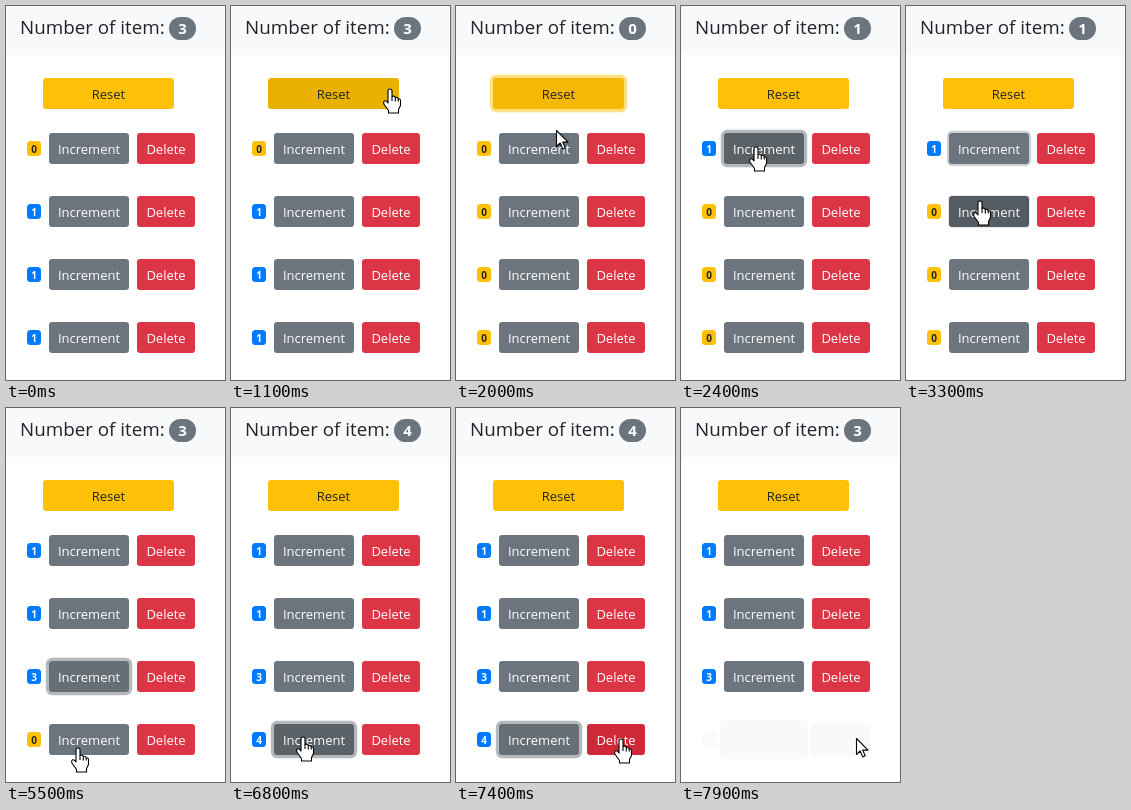
An HTML page with a canvas for the animation above (8 s loop, 219 px wide and 374 px high).

```html
<!DOCTYPE html>
<html lang="en">
<head>
<meta charset="utf-8">
<title>Item counters</title>
<style>
  html, body { margin: 0; width: 100%; height: 100%; overflow: hidden; background: #fff; }
  canvas { display: block; }
</style>
</head>
<body>
<canvas id="stage" width="219" height="374"></canvas>
<script>
const ctx = document.getElementById('stage').getContext('2d');
const LOOP = 8000, STEP = 100, EASE = 150;
const FONT = '"Open Sans", "Noto Sans", sans-serif';
const DELETED_AT = 7900;

// Pointer stops: time, x, y. The pointer jumps from one to the next.
const moves = [
  [0, -50, -50],
  [800, 204, 60], [900, 184, 70], [1000, 164, 80], [1100, 159, 83],
  [1800, 152, 91], [1900, 133, 109], [2000, 100, 124], [2100, 80, 136], [2200, 75, 141],
  [2900, 75, 157], [3000, 74, 178], [3100, 74, 195],
  [3600, 74, 220], [3700, 73, 262], [3800, 73, 271],
  [5400, 72, 295], [5500, 72, 340], [5600, 72, 333], [5700, 72, 329],
  [7200, 95, 332], [7300, 138, 333], [7400, 165, 331], [7500, 175, 330]
];

const palettes = {
  warning: { base: [255, 193, 7], hover: [224, 168, 0], active: [211, 158, 0], text: '#212529' },
  secondary: { base: [108, 117, 125], hover: [90, 98, 104], active: [84, 91, 98], text: '#fff' },
  danger: { base: [220, 53, 69], hover: [200, 35, 51], active: [189, 33, 48], text: '#fff' }
};

const makeButton = (label, x, y, w, palette, pressed, released) =>
  ({ label, x, y, w, h: 31, palette: palettes[palette], pressed, released });

const reset = makeButton('Reset', 37, 72, 131, 'warning', 1150, 1300);
const rows = [
  { start: 0, clicks: [2400] },
  { start: 1, clicks: [3400] },
  { start: 1, clicks: [4300, 4700, 5100] },
  { start: 1, clicks: [6100, 6300, 6500, 6800] }
].map((row, i) => {
  const y = 127 + 63 * i, first = row.clicks[0];
  const last = i === 3;
  return {
    ...row, y,
    increment: makeButton('Increment', 43, y, 80, 'secondary', first - 150, first),
    remove: makeButton('Delete', 131, y, 58, 'danger', last ? 7750 : Infinity, last ? DELETED_AT : Infinity)
  };
});
const buttons = [reset, ...rows.flatMap(row => [row.increment, row.remove])];

const contains = (b, x, y) => x >= b.x && x < b.x + b.w && y >= b.y && y < b.y + b.h;

// Follows a series of on/off switches with a linear transition.
function transition(switches, t) {
  let level = 0;
  switches.forEach(([time, on], i) => {
    if (time >= t) return;
    const end = Math.min(t, i + 1 < switches.length ? switches[i + 1][0] : LOOP);
    level = Math.min(1, Math.max(0, level + (on ? 1 : -1) * (end - time) / EASE));
  });
  return level;
}

for (const b of buttons) {
  b.hovers = moves.map(([time, x, y]) => [time, contains(b, x, y)]);
  const blur = Math.min(LOOP, ...buttons.map(o => o.pressed).filter(p => p > b.pressed));
  b.focuses = [[b.pressed, true], [blur, false]];
}

const rgb = (c, alpha = 1) => `rgba(${c.map(Math.round)},${alpha})`;
const mix = (a, b, k) => a.map((v, i) => v + (b[i] - v) * k);

function box(x, y, w, h, r, fill) {
  ctx.fillStyle = fill;
  ctx.beginPath();
  ctx.roundRect(x, y, w, h, r);
  ctx.fill();
}

function text(value, x, y, size, fill, weight = 400, align = 'center') {
  ctx.font = `${weight} ${size}px ${FONT}`;
  ctx.textAlign = align;
  ctx.fillStyle = fill;
  ctx.fillText(value, x, y);
}

function drawButton(b, t) {
  const p = b.palette;
  const focus = transition(b.focuses, t);
  if (focus > 0) {
    const s = 3.2 * focus;
    box(b.x - s, b.y - s, b.w + 2 * s, b.h + 2 * s, 3.2 + s, rgb(p.base, 0.5 * focus));
  }
  const held = t >= b.pressed && t < b.released;
  const color = held ? p.active : mix(p.base, p.hover, transition(b.hovers, t));
  box(b.x, b.y, b.w, b.h, 3.2, rgb(color));
  text(b.label, b.x + b.w / 2, b.y + 21, 13, p.text);
}

function countOf(row, t) {
  return (t < 1300 ? row.start : 0) + row.clicks.filter(c => c <= t).length;
}

function drawRow(row, t) {
  const count = countOf(row, t);
  box(21, row.y + 8, 14, 15, 3.5, count ? '#007bff' : '#ffc107');
  text(count, 28, row.y + 20, 10, count ? '#fff' : '#212529', 700);
  drawButton(row.increment, t);
  drawButton(row.remove, t);
}

function drawFadedRow(y) {
  box(21, y + 8, 14, 15, 3, '#fafafb');
  box(39, y - 4, 88, 39, 6, '#f8f9fa');
  box(130, y - 1, 60, 33, 4, '#f8f9fa');
}

const arrowShape = new Path2D('M.5 .5V16.5L4.2 13L6.7 18.9L9.2 17.8L6.7 12.1H12Z');
const handShape = new Path2D(
  'M-2 14V1.8Q-2 0 0 0Q2 0 2 1.8V7.5Q4.6 6.5 5.3 8.5Q7.6 7.7 8.2 9.8Q10.5 9.5 10.5 12' +
  'V16.5L8.5 20.5V24H-1.5V21.5L-5.8 15.5Q-7.2 12.5-5.2 11.8Q-3.7 11.5-2 14Z');
const handLines = new Path2D('M2 7.5V12M5.3 8.5V12.5M8.2 9.8V12.5');

function drawPointer(t) {
  const [, x, y] = moves.findLast(m => m[0] <= t);
  const target = buttons.find(b => contains(b, x, y));
  const gone = t >= DELETED_AT && target && target.y === rows[3].y;
  const hand = target && !gone;
  const shape = hand ? handShape : arrowShape;
  ctx.save();
  ctx.translate(x, y);
  ctx.fillStyle = '#fff';
  ctx.strokeStyle = '#000';
  ctx.lineWidth = 1.1;
  ctx.lineJoin = 'round';
  ctx.fill(shape);
  ctx.stroke(shape);
  if (hand) ctx.stroke(handLines);
  ctx.restore();
}

function draw(t) {
  ctx.fillStyle = '#fff';
  ctx.fillRect(0, 0, 219, 374);
  ctx.fillStyle = '#f8f9fa';
  ctx.fillRect(0, 0, 219, 49);

  const present = t < DELETED_AT ? rows : rows.slice(0, 3);
  text('Number of item:', 14, 28, 18.8, '#212529', 400, 'left');
  box(163, 11, 27, 23, 11.5, '#6c757d');
  text(present.filter(row => countOf(row, t) > 0).length, 176.5, 28, 15, '#fff', 700);

  drawButton(reset, t);
  present.forEach(row => drawRow(row, t));
  if (t >= DELETED_AT) drawFadedRow(rows[3].y);
  drawPointer(t);
}

const origin = performance.now();
function tick() {
  const t = (performance.now() - origin) % LOOP;
  draw(Math.floor(t / STEP) * STEP);
  requestAnimationFrame(tick);
}
tick();
</script>
</body>
</html>
```
